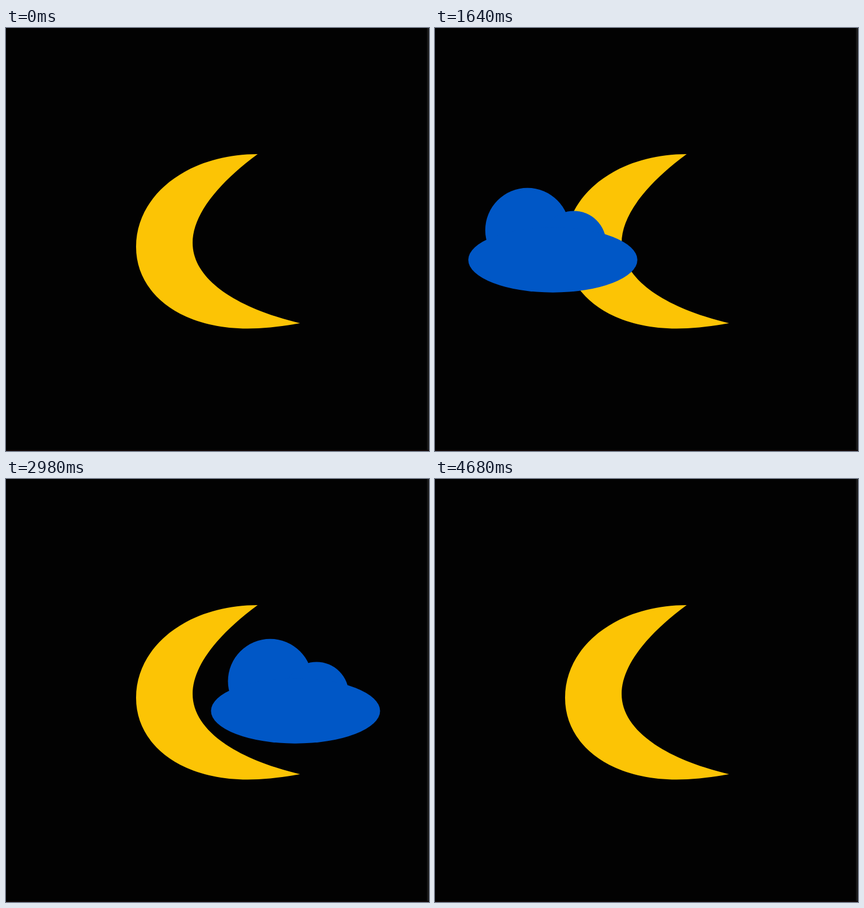
These frames come from a looping animation (748x748 px, 4.72 s). An HTML page:

```html
<!DOCTYPE html>
<html>
<head>
<meta charset="utf-8">
<title>Cloud passing the moon</title>
<style>
  html, body { margin: 0; height: 100%; overflow: hidden; background: #020202; }
  svg { display: block; width: 100vw; height: 100vh; }
</style>
</head>
<body>
<svg viewBox="0 0 748 748">
  <rect width="748" height="748" fill="#020202"/>
  <path fill="#fcc405" d="M445 223C323 223 230 294 230 387C230 470 309 531.5 427 531.5
    C456 531.5 487 528 520 522C403 494 330 442.5 330 380C330 334 369 279 445 223Z"/>
  <!-- the cloud's right tip sits at x = 0 -->
  <g id="cloud" fill="#0057c6">
    <circle cx="-194.3" cy="357.5" r="74.7"/>
    <circle cx="-112.3" cy="380.5" r="57"/>
    <ellipse cx="-149.5" cy="410" rx="149.5" ry="57.7"/>
  </g>
  <rect x="744.5" width="3.5" height="748" fill="#1a1a1a"/>
  <rect y="746" width="748" height="2" fill="#120808"/>
</svg>
<script>
  const LOOP = 4720;      // ms
  const START_X = -14;    // right tip just outside the left edge
  const SPEED = 0.2266;   // px per ms
  const cloud = document.getElementById('cloud');
  const start = performance.now();

  function draw() {
    const t = (performance.now() - start) % LOOP;
    cloud.setAttribute('transform', `translate(${START_X + SPEED * t} 0)`);
    requestAnimationFrame(draw);
  }
  draw();
</script>
</body>
</html>
```
